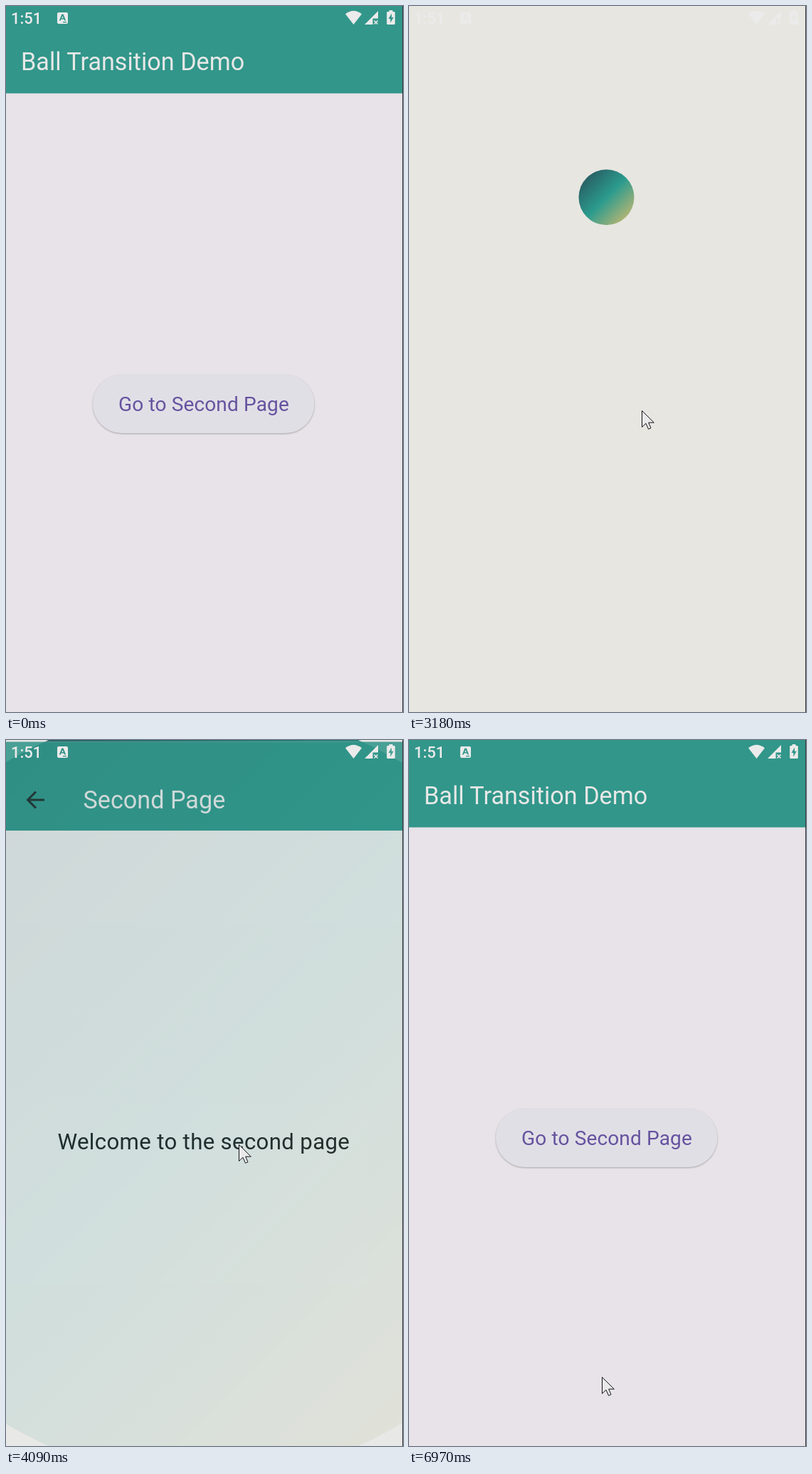
These frames come from a looping animation (558x990 px, 7210 ms). An HTML page:

```html
<!DOCTYPE html>
<html lang="en">
<head>
<meta charset="utf-8">
<title>Ball Transition Demo</title>
<style>
  html, body { margin: 0; width: 100%; height: 100%; overflow: hidden; background: #e7e3e8; }
  svg { display: block; width: 558px; height: 990px; font-family: Roboto, "Noto Sans", sans-serif; }
  .bar { fill: #32968a; }
  .title { font-size: 34.2px; fill: #e7e8e7; }
  .label { font-size: 28.1px; letter-spacing: .1px; fill: #65539f; }
  .body { font-size: 31.2px; letter-spacing: .34px; fill: #1c1f20; }
  .clock { font-size: 22px; font-weight: 500; }
  .button { fill: #e1dfe6; filter: drop-shadow(0 1.5px 1.2px rgba(0, 0, 0, .28)); }
</style>
</head>
<body>
<svg viewBox="0 0 558 990">
  <defs>
    <linearGradient id="paint" x1="0" y1="0" x2="1" y2="1">
      <stop offset="0" stop-color="#284a55"/>
      <stop offset=".5" stop-color="#2b9b8e"/>
      <stop offset="1" stop-color="#e2be6a"/>
    </linearGradient>
  </defs>

  <g id="first">
    <rect width="558" height="990" fill="#e7e3e8"/>
    <rect class="bar" width="558" height="122.5"/>
    <text class="title" x="21" y="90">Ball Transition Demo</text>
    <rect class="button" x="122" y="517" width="311.5" height="82" rx="41"/>
    <text class="label" x="158" y="568">Go to Second Page</text>
  </g>

  <rect id="veil" width="558" height="990" fill="#e7e6e1"/>
  <circle id="ball" cx="277.5" fill="url(#paint)"/>

  <g id="second">
    <rect width="558" height="990" fill="#e9e9e9"/>
    <rect class="bar" width="558" height="124.5"/>
    <path d="M54 81.4H31M42 70L30.6 81.4L42 92.8" fill="none" stroke="#22302f" stroke-width="3"/>
    <text class="title" x="108.5" y="93">Second Page</text>
    <text class="body" x="72.4" y="571.5">Welcome to the second page</text>
  </g>

  <g fill="#ebebeb" fill-rule="evenodd">
    <text class="clock" x="7" y="25">1:51</text>
    <path d="M74 9h11a2 2 0 0 1 2 2v12a2 2 0 0 1-2 2h-11a2 2 0 0 1-2-2v-12a2 2 0 0 1 2-2z
      M78.4 11.5l-3.6 9h2l.8-2h3.8l.8 2h2l-3.6-9z M79.5 14l1.2 3h-2.4z M80 22v1.2h5v-1.2z"/>
    <path d="M488.5 26L477 11.3Q488.5 2.3 500 11.3Z"/>
    <path d="M504 26L523 7V17.5H515.5V26Z"/>
    <path d="M517.5 20.5l5 5m0-5l-5 5" stroke="#ebebeb" stroke-width="1.6"/>
    <path d="M538.5 6h5v2h2a1.3 1.3 0 0 1 1.3 1.3v15.4a1.3 1.3 0 0 1-1.3 1.3h-9a1.3 1.3 0 0 1-1.3-1.3v-15.4a1.3 1.3 0 0 1 1.3-1.3h2z
      M542 10.5l-4.5 7.5h2.8v5.5l4.5-7.7h-2.8z"/>
  </g>

  <path id="cursor" d="M.5 .5V23.5L6 18.3L9.5 26.3L13 24.8L9.7 17.2H17.3Z" fill="#e9e9e9" stroke="#15151c"/>
  <rect x="557" width="1" height="990" fill="#3c3c40"/>
</svg>

<script>
const LOOP = 7210;
const PUSH = { at: 2640.5, ms: 1492 };
const POP = { at: 5455.6, ms: 300 };
const [veil, ball, second, cursor] =
  ["veil", "ball", "second", "cursor"].map(id => document.getElementById(id));

const clamp = x => Math.min(1, Math.max(0, x));
const span = (x, from, to) => clamp((x - from) / (to - from));
const mix = (a, b, k) => a + (b - a) * k;

function bezier(x1, y1, x2, y2) {
  const at = (a, b, s) => 3 * a * s * (1 - s) ** 2 + 3 * b * s * s * (1 - s) + s ** 3;
  return x => {
    let lo = 0, hi = 1;
    for (let i = 0; i < 24; i++) {
      const mid = (lo + hi) / 2;
      if (at(x1, x2, mid) < x) lo = mid; else hi = mid;
    }
    return at(y1, y2, (lo + hi) / 2);
  };
}
const easeIn = bezier(.42, 0, 1, 1);
const easeOut = bezier(0, 0, .58, 1);
const easeInOut = bezier(.42, 0, .58, 1);
const glide = bezier(.3, 0, .2, 1);

function bounce(x) {
  const k = 7.5625;
  if (x < 1 / 2.75) return k * x * x;
  if (x < 2 / 2.75) return k * (x - 1.5 / 2.75) ** 2 + .75;
  if (x < 2.5 / 2.75) return k * (x - 2.25 / 2.75) ** 2 + .9375;
  return k * (x - 2.625 / 2.75) ** 2 + .984375;
}

// Pointer trips: start, end, from, to, easing
const trips = [
  [2090, 2480, [558, 450], [327, 567], easeOut],
  [4200, 4960, [327, 567], [36, 80], easeInOut],
  [5960, 6960, [36, 80], [271, 893], glide]
];

function pointer(t) {
  const [from, to, a, b, ease] = trips.filter(trip => t >= trip[0]).pop() || trips[0];
  const k = ease(span(t, from, to));
  return a.map((n, i) => Math.round(mix(n, b[i], k)));
}

function draw(t) {
  const p = t < POP.at
    ? clamp((t - PUSH.at) / PUSH.ms)
    : 1 - clamp((t - POP.at) / POP.ms);
  const grow = span(p, .782, 1);

  veil.setAttribute("opacity", span(p, 0, .2));
  ball.setAttribute("cy", mix(-198, 495, bounce(span(p, .2, .744))));
  ball.setAttribute("r", mix(39, 668, easeIn(grow)));
  second.setAttribute("opacity", grow);
  second.setAttribute("transform", `translate(0 ${94 * (1 - easeOut(grow))})`);
  cursor.setAttribute("transform", `translate(${pointer(t)})`);
}

const start = performance.now();
function tick() {
  draw((performance.now() - start) % LOOP);
  requestAnimationFrame(tick);
}
tick();
</script>
</body>
</html>
```
